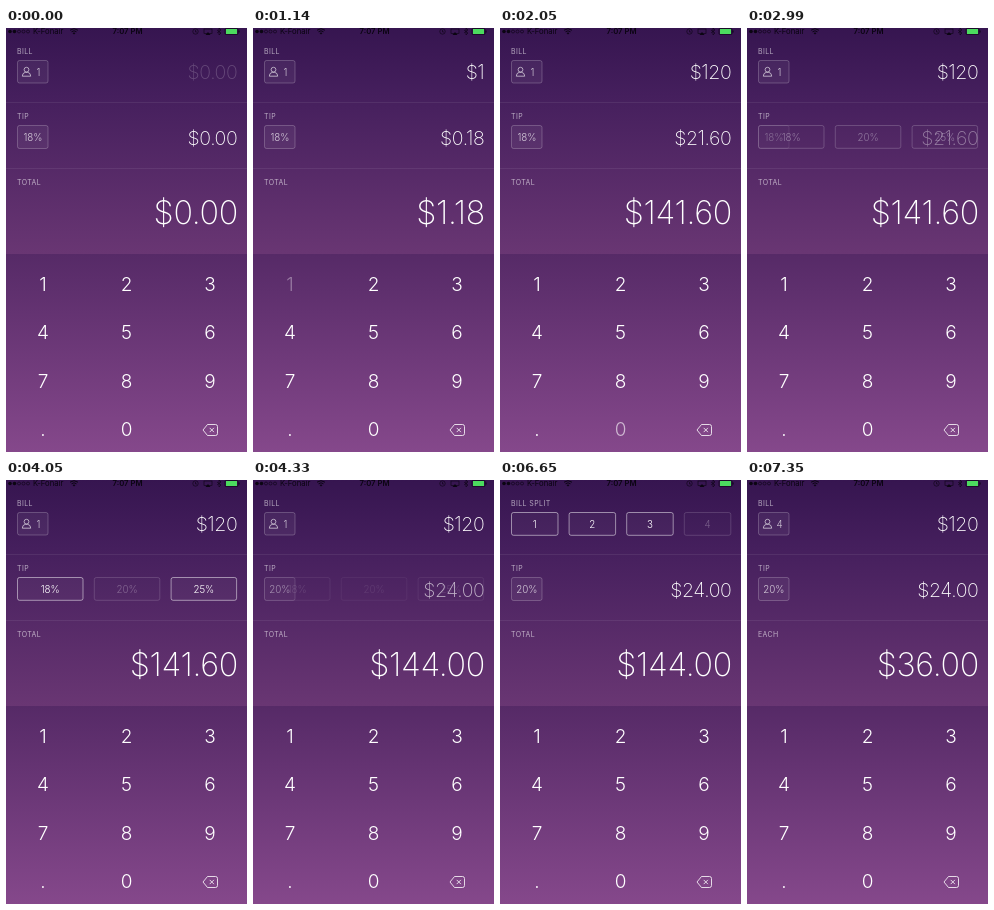
Write an HTML page that moves like this. It is 241 px wide and 424 px high and loops after 8000 ms.

```html
<!DOCTYPE html>
<html lang="en">
<head>
<meta charset="utf-8">
<title>Tip calculator</title>
<style>
  html, body { margin: 0; width: 100%; height: 100%; overflow: hidden; background: #361550; }
  svg { display: block; width: 100%; height: 100%; }
  text { font-family: Inter, "Open Sans", sans-serif; fill: #fff; }
  .label { font-size: 7px; letter-spacing: .4px; opacity: .62; }
  .amount { font-size: 19.5px; font-weight: 200; letter-spacing: -.4px; text-anchor: end; }
  .total { font-size: 32.3px; letter-spacing: -.3px; }
  .key { font-size: 19px; font-weight: 300; text-anchor: middle; }
  .small { font-size: 9.8px; font-weight: 300; text-anchor: middle; }
  .box { fill: #fff; fill-opacity: .07; stroke: #fff; stroke-opacity: .36; stroke-width: .8; }
  .option .box { fill-opacity: .03; stroke-opacity: .62; }
  .line { fill: none; stroke: #fff; stroke-width: .8; }
  .status text { font-size: 7.7px; fill: #0b0512; }
</style>
</head>
<body>
<svg viewBox="0 0 241 424" preserveAspectRatio="none">
  <defs>
    <linearGradient id="upper" x2="0" y2="1">
      <stop stop-color="#361550"/>
      <stop offset=".3" stop-color="#451f5d"/>
      <stop offset="1" stop-color="#693673"/>
    </linearGradient>
    <linearGradient id="lower" x2="0" y2="1">
      <stop stop-color="#562a67"/>
      <stop offset="1" stop-color="#85488b"/>
    </linearGradient>
  </defs>
  <rect width="241" height="226" fill="url(#upper)"/>
  <rect y="226" width="241" height="198" fill="url(#lower)"/>
  <path d="M0 74.5H241M0 140.5H241" stroke="#fff" stroke-opacity=".07"/>

  <g class="status" fill="#0b0512">
    <circle cx="4" cy="3.5" r="1.8"/><circle cx="8.5" cy="3.5" r="1.8"/>
    <g fill="none" stroke="#0b0512" stroke-width=".6">
      <circle cx="13" cy="3.5" r="1.5"/><circle cx="17.5" cy="3.5" r="1.5"/><circle cx="22" cy="3.5" r="1.5"/>
      <circle cx="189.5" cy="3.5" r="2.7"/><path d="M189.5 2v2h1.5"/>
      <rect x="198" y="1" width="8" height="4.5"/>
      <path d="M211 2l4 3-2 2v-7l2 2-4 3"/>
      <rect x="219" y=".5" width="13" height="6" rx="1"/>
      <path d="M64 2.2q4-3 8 0M65.5 3.8q2.500-2 5 0" stroke-width="1"/>
    </g>
    <text x="27" y="6">K-Fonair</text>
    <path d="M66.500 5q1.500-1 3 0l-1.500 1.600z"/>
    <text x="121.5" y="6" text-anchor="middle" font-weight="600">7:07 PM</text>
    <path d="M199.5 7l2.500-3 2.500 3z"/>
    <rect x="220" y="1" width="11" height="5" fill="#4cdb5f"/>
    <rect x="232.5" y="2.5" width="1" height="2"/>
  </g>

  <text id="billLabel" class="label" x="11" y="25.5"></text>
  <text class="label" x="11" y="90.5">TIP</text>
  <text id="totalLabel" class="label" x="11" y="156.5"></text>

  <g id="billBadge">
    <rect class="box" x="11.5" y="32.5" width="30.5" height="22.5" rx="2"/>
    <circle class="line" cx="20.5" cy="41.7" r="2.4"/>
    <path class="line" d="M16.3 48.2q0-3.2 2.900-3.900h2.600q2.900.7 2.900 3.900z"/>
    <text id="people" class="small" x="32.5" y="47.5"></text>
  </g>
  <g id="tipBadge">
    <rect class="box" x="11.5" y="97.5" width="30.5" height="23" rx="2"/>
    <text id="rate" class="small" x="26.9" y="113"></text>
  </g>
  <g id="splitOptions"></g>
  <g id="tipOptions"></g>

  <text id="bill" class="amount" x="231.4" y="51"></text>
  <text id="tip" class="amount" x="231.4" y="116.5"></text>
  <text id="total" class="amount total" x="232" y="195.5"></text>

  <g id="keys"></g>
  <path class="line" d="M201.5 396.5h8q2 0 2 2v7q0 2-2 2h-8l-4.500-5.500zM203.7 399.9l4.200 4.200m0-4.200l-4.200 4.200"/>
</svg>
<script>
const LOOP = 8000;
const BADGE = 0.76;
const $ = id => document.getElementById(id);
const clamp = v => Math.max(0, Math.min(1, v));
const easeOut = p => 1 - (1 - p) ** 2;
const money = v => '$' + v.toFixed(2);

function add(parent, tag, attrs, text = '') {
  const node = document.createElementNS('http://www.w3.org/2000/svg', tag);
  for (const name in attrs) node.setAttribute(name, attrs[name]);
  node.textContent = text;
  return parent.appendChild(node);
}

const keys = {};
[...'123456789.0'].forEach((key, i) => {
  keys[key] = add($('keys'), 'text', {
    class: 'key', x: 37 + i % 3 * 83.5, y: 262.9 + Math.floor(i / 3) * 48.5
  }, key);
});

function addOptions(id, labels, y, width, step) {
  return labels.map((label, i) => {
    const x = 11.5 + i * step;
    const group = add($(id), 'g', { class: 'option' });
    add(group, 'rect', { class: 'box', x, y, width, height: 22.8, rx: 2 });
    add(group, 'text', { class: 'small', x: x + width / 2, y: y + 15.2 }, label);
    return group;
  });
}
const splits = addOptions('splitOptions', ['1', '2', '3', '4'], 32.5, 46.5, 57.6);
const rates = addOptions('tipOptions', ['18%', '20%', '25%'], 97.5, 65.5, 76.8);

const presses = [['1', 1020, 380], ['2', 1440, 380], ['0', 1880, 290]];
const tipOpen = 2840, tipPick = 4050, tipClose = 4170;
const splitOpen = 5510, splitPick = 6650, splitClose = 6870;

// 0 = closed, 1 = options fully shown
function openness(t, open, openTime, close) {
  const shown = easeOut(clamp((t - open) / openTime));
  return shown * (1 - easeOut(clamp((t - close) / 400)));
}

// The amount and badge give way before the options become clear.
function crossfade(open, amount, badge, options, amountOpacity) {
  $(amount).style.opacity = amountOpacity * (1 - open);
  $(badge).style.opacity = BADGE * (1 - open);
  $(options).style.opacity = open ** 2;
}

function pressOpacity(t, start, time) {
  const p = (t - start) / time;
  return p < 0 || p >= 1 ? 1 : 0.3 + 0.7 * clamp((p - 0.25) / 0.75);
}

function draw(t) {
  const typed = presses.filter(p => t >= p[1]).map(p => p[0]).join('');
  const bill = Number(typed);
  const percent = t < tipClose ? 18 : 20;
  const people = t < splitClose ? 1 : 4;
  const tip = bill * percent / 100;

  $('bill').textContent = typed ? '$' + typed : '$0.00';
  $('tip').textContent = money(tip);
  $('total').textContent = money((bill + tip) / people);
  $('people').textContent = people;
  $('rate').textContent = percent + '%';
  $('billLabel').textContent = t >= splitOpen && t < splitClose ? 'BILL SPLIT' : 'BILL';
  $('totalLabel').textContent = people > 1 ? 'EACH' : 'TOTAL';

  crossfade(openness(t, splitOpen, 300, splitClose),
    'bill', 'billBadge', 'splitOptions', typed ? 1 : 0.2);
  crossfade(openness(t, tipOpen, 400, tipClose),
    'tip', 'tipBadge', 'tipOptions', 1);

  rates[1].style.opacity = pressOpacity(t, tipPick, 400);
  splits[3].style.opacity = pressOpacity(t, splitPick, 450);
  for (const [key, start, time] of presses)
    keys[key].style.opacity = pressOpacity(t, start, time);
}

const begin = performance.now();
function tick() {
  draw((performance.now() - begin) % LOOP);
  requestAnimationFrame(tick);
}
tick();
</script>
</body>
</html>
```
